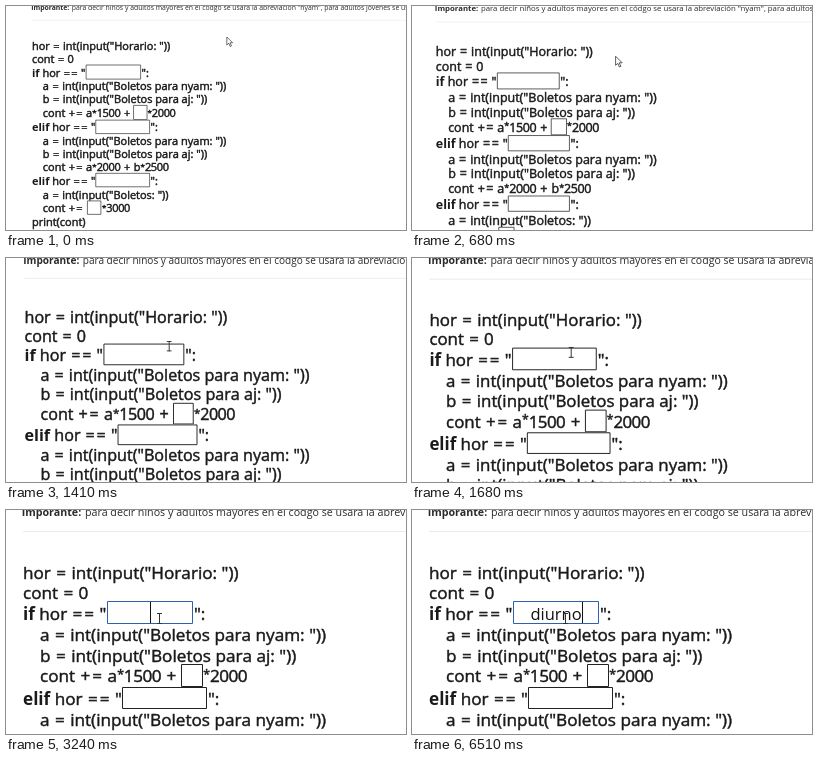
Write an HTML page with a canvas that moves like this. It is 400 px wide and 224 px high and loops after 7060 ms.

```html
<!DOCTYPE html>
<html lang="es">
<head>
<meta charset="utf-8">
<title>Boletos</title>
<style>
  html, body { margin: 0; width: 100%; height: 100%; overflow: hidden; background: #fff; }
  canvas { display: block; width: 400px; height: 224px; }
</style>
</head>
<body>
<canvas id="stage"></canvas>
<script>
const W = 400, H = 224, LOOP = 7060;
const canvas = document.getElementById('stage');
const ctx = canvas.getContext('2d');
const ratio = window.devicePixelRatio || 1;
canvas.width = W * ratio;
canvas.height = H * ratio;

const FAMILY = '"Open Sans", "Noto Sans", sans-serif';
const SIZE = 17.15, INK = '#1a1a1a', BORDER = '#222', LEFT = 17, INDENT = 34;
const FOCUS = { x: 42, y: 1 }, START_SCALE = 0.641;
const FIELD = { x: 101, y: 91, w: 86, h: 23 };

// Advances in em for symbols; digits share one width
const ADVANCE = { '=': 0.684, '+': 0.684, '*': 0.417 };

const CODE = [
  [LEFT, 68.8, 'hor = int(input("Horario: "))'],
  [LEFT, 88.8, 'cont = 0'],
  [LEFT, 110, 'if', ' hor == "'],
  [188, 110, '":'],
  [INDENT, 131.2, 'a = int(input("Boletos para nyam: "))'],
  [INDENT, 151.5, 'b = int(input("Boletos para aj: "))'],
  [INDENT, 172.3, 'cont += a*1500 + '],
  [197, 172.3, '*2000'],
  [LEFT, 194.5, 'elif', ' hor == "'],
  [202, 194.5, '":'],
  [INDENT, 216.3, 'a = int(input("Boletos para nyam: "))'],
  [INDENT, 236.3, 'b = int(input("Boletos para aj: "))'],
  [INDENT, 257, 'cont += a*2000 + b*2500'],
  [LEFT, 279, 'elif', ' hor == "'],
  [202, 279, '":'],
  [INDENT, 300, 'a = int(input("Boletos: "))'],
  [INDENT, 321.5, 'cont += '],
  [126, 321.5, '*3000'],
  [LEFT, 342, 'print(cont)']
];

const BLANKS = [[175, 154, 22, 23], [116, 177, 85, 22], [116, 260, 85, 22], [103, 303, 22, 22]];

// time, x, y of the pointer on the page
const POINTER = [
  [30, 321, 47.8], [680, 264, 68.6], [1060, 228, 75.5], [1410, 171, 93.7],
  [1440, 168, 94.5], [1480, 168, 94.5], [2000, 150, 98], [2280, 150, 98],
  [2410, 149, 114], [2650, 149, 114], [2800, 151, 117], [3000, 153.5, 108.5]
];

const TYPED = [[4340, 'd'], [4510, 'di'], [5370, 'diu'], [5650, 'diur'], [6100, 'diurn'], [6510, 'diurno']];

const clamp = v => Math.max(0, Math.min(1, v));
const font = (weight, size) => { ctx.font = `${weight} ${size}px ${FAMILY}`; };

// Sine ease with a slightly longer tail
function scaleAt(t) {
  const p = 1 - Math.pow(1 - clamp((t - 130) / 1870), 1.14);
  return START_SCALE + (1 - START_SCALE) * (1 - Math.cos(Math.PI * p)) / 2;
}

function pointerAt(t) {
  let a = POINTER[0];
  for (const b of POINTER) {
    if (t < b[0]) {
      const p = clamp((t - a[0]) / (b[0] - a[0] || 1));
      return [a[1] + (b[1] - a[1]) * p, a[2] + (b[2] - a[2]) * p];
    }
    a = b;
  }
  return [a[1], a[2]];
}

function drawRun(text, x, y, weight) {
  for (const ch of text) {
    const star = ch === '*';
    font(weight, star ? SIZE * 0.72 : SIZE);
    const own = ctx.measureText(ch).width;
    const em = /\d/.test(ch) ? 0.54 : ADVANCE[ch];
    const step = em ? em * SIZE : own;
    const left = x + (step - own) / 2;
    const base = star ? y - SIZE * 0.2 : y;
    ctx.fillText(ch, left, base);
    if (weight === 400) ctx.strokeText(ch, left, base);
    x += step;
  }
  return x;
}

function drawHeader() {
  ctx.fillStyle = '#2a2a2a';
  font(700, 10.7);
  ctx.fillText('Imporante:', 15.7, 6.2);
  font(400, 10.7);
  ctx.fillText('para decir niños y adultos mayores en el códgo se usara la abreviación "nyam", para adultos jóvenes se usara "aj".', 79, 6.2);
  ctx.fillStyle = '#ebebeb';
  ctx.fillRect(LEFT, 21, 700, 1);
}

function drawCode(k) {
  ctx.fillStyle = ctx.strokeStyle = INK;
  ctx.lineWidth = 0.45 / k;
  for (const [x, y, first, rest] of CODE) {
    const end = drawRun(first, x, y, rest ? 700 : 400);
    if (rest) drawRun(rest, end, y, 400);
  }
}

function drawBox(x, y, w, h, color) {
  ctx.fillStyle = '#fff';
  ctx.fillRect(x, y, w, h);
  ctx.strokeStyle = color;
  ctx.lineWidth = 1;
  ctx.strokeRect(x + 0.5, y + 0.5, w - 1, h - 1);
}

function drawField(t) {
  const { x, y, w, h } = FIELD;
  const active = t >= 3170;
  drawBox(x, y, w, h, active ? '#2f5fae' : BORDER);
  if (!active) return;
  let text = '';
  for (const [at, value] of TYPED) if (t >= at) text = value;
  font(400, 16.5);
  const width = ctx.measureText(text).width;
  const left = x + w / 2 - width / 2;
  ctx.fillStyle = '#111';
  ctx.fillText(text, left, 109.5);
  const hidden = t < 3240 || (t >= 3960 && t < 4340) || (t >= 5240 && t < 5370);
  if (!hidden) ctx.fillRect(Math.round(left + width), 92, 1, 21);
}

function drawArrow(x, y) {
  const shape = [[0, 0], [0, 12.5], [3, 9.8], [5.2, 14.8], [7.2, 13.9], [5, 9], [9, 9]];
  ctx.beginPath();
  for (const [dx, dy] of shape) ctx.lineTo(x + dx, y + dy);
  ctx.closePath();
  ctx.fillStyle = '#fff';
  ctx.fill();
  ctx.strokeStyle = '#222';
  ctx.lineWidth = 1;
  ctx.stroke();
}

function drawBeam(x, y) {
  ctx.fillStyle = '#333';
  ctx.fillRect(x - 0.5, y - 5.5, 1, 11);
  for (const dy of [-5.5, 4.5]) ctx.fillRect(x - 2.5, y + dy, 5, 1);
}

function draw(t) {
  const k = scaleAt(t);
  ctx.setTransform(ratio, 0, 0, ratio, 0, 0);
  ctx.fillStyle = '#fff';
  ctx.fillRect(0, 0, W, H);
  ctx.translate(FOCUS.x, FOCUS.y);
  ctx.scale(k, k);
  ctx.translate(-FOCUS.x, -FOCUS.y);
  ctx.lineJoin = 'round';
  drawHeader();
  drawCode(k);
  for (const b of BLANKS) drawBox(...b, BORDER);
  drawField(t);
  const [x, y] = pointerAt(t);
  if (t < 1340) drawArrow(x, y);
  else drawBeam(x, y);
}

const begin = performance.now();
function tick() {
  draw((performance.now() - begin) % LOOP);
  requestAnimationFrame(tick);
}
tick();
</script>
</body>
</html>
```
